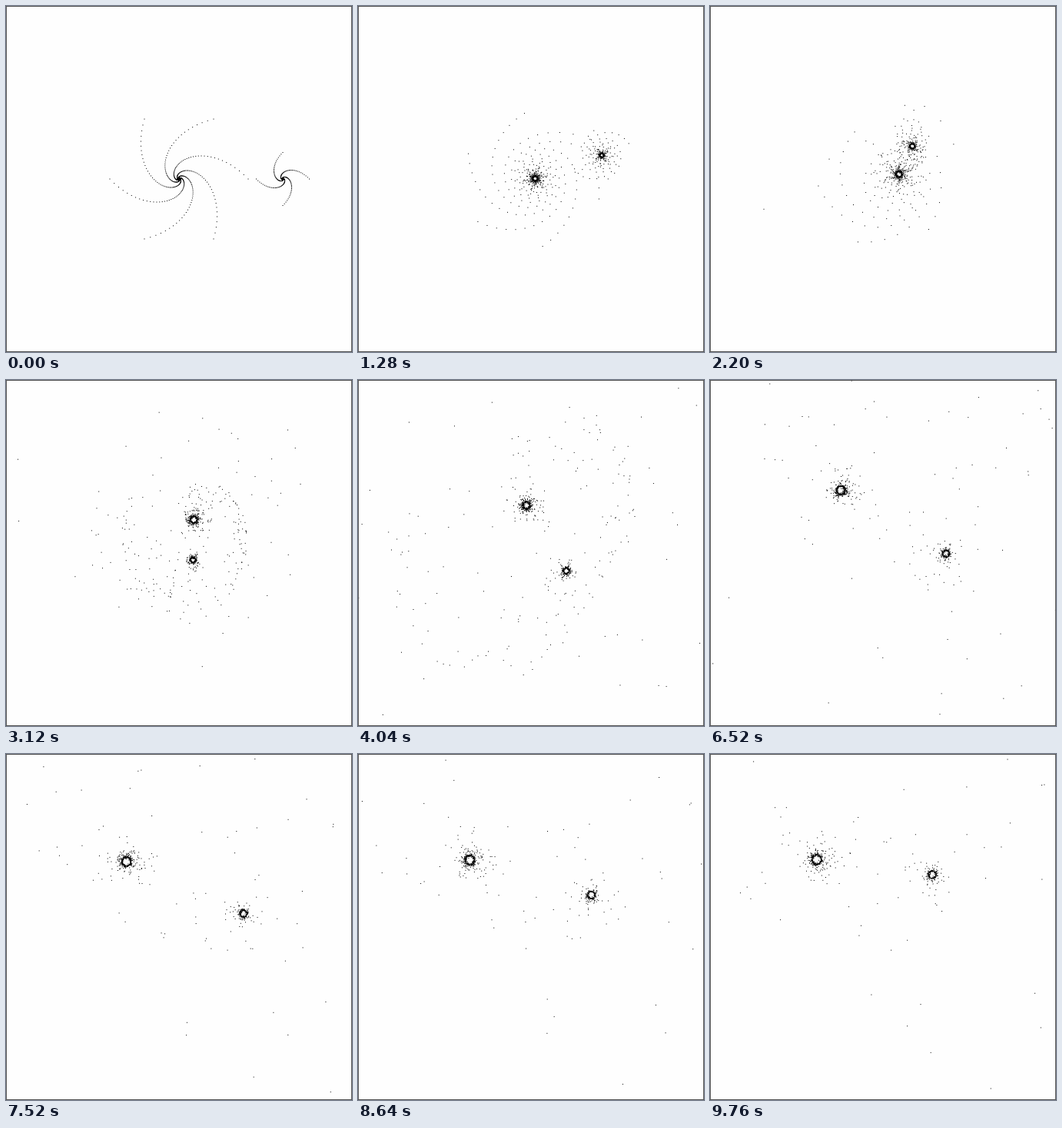
Write an HTML page with a canvas that moves like this. It is 450 px wide and 450 px high and loops after 9.8 s.

```html
<!DOCTYPE html>
<html>
<head>
<meta charset="utf-8">
<title>Galaxy encounter</title>
<style>
  html, body { margin: 0; width: 100%; height: 100%; overflow: hidden; background: #fefefe; }
  canvas { display: block; }
</style>
</head>
<body>
<canvas id="stage" width="450" height="450"></canvas>
<script>
const ctx = document.getElementById('stage').getContext('2d');
const SIZE = 450, FRAME_MS = 40, FRAMES = 245;
const SUBSTEPS = 120, DT = 1 / SUBSTEPS;
const HEATING = 0.0004;   // slow outward drift that opens the rings
const WIND = 1.045;       // logarithmic spiral: radians per e-fold of radius
const RATIO = Math.exp(-0.064), INNER = 0.4;

const cores = [
  { x: 225, y: 225, vx: 0, vy: 0, mass: 317, arms: 6, radius: 90 },
  { x: 360, y: 225, vx: -1, vy: -1, mass: 158, arms: 4, radius: 34.5 }
];

function makeStars(core) {
  const stars = [];
  for (let arm = 0; arm < core.arms; arm++) {
    for (let r = core.radius; r > INNER; r *= RATIO) {
      const angle = arm * 2 * Math.PI / core.arms - WIND * Math.log(core.radius / r);
      const c = Math.cos(angle), s = Math.sin(angle), speed = Math.sqrt(core.mass / r);
      stars.push({
        x: core.x + r * c, y: core.y + r * s,
        vx: core.vx + speed * s, vy: core.vy - speed * c
      });
    }
  }
  return stars;
}

const stars = cores.flatMap(makeStars);
const [big, small] = cores;

function pull(body, core) {
  const dx = core.x - body.x, dy = core.y - body.y;
  const d2 = dx * dx + dy * dy + 1e-6;
  const k = core.mass / (d2 * Math.sqrt(d2));
  body.ax += dx * k;
  body.ay += dy * k;
}

function move(body, heating) {
  body.vx += body.ax * DT;
  body.vy += body.ay * DT;
  body.x += (body.vx - heating * body.ax) * DT;
  body.y += (body.vy - heating * body.ay) * DT;
}

function step() {
  for (const star of stars) {
    star.ax = star.ay = 0;
    pull(star, big);
    pull(star, small);
    move(star, HEATING);
  }
  for (const core of cores) core.ax = core.ay = 0;
  pull(big, small);
  pull(small, big);
  for (const core of cores) move(core, 0);
}

const history = [];
for (let f = 0; f < FRAMES; f++) {
  history.push(Float32Array.from(stars.flatMap(s => [s.x, s.y])));
  for (let i = 0; i < SUBSTEPS; i++) step();
}

function draw(points) {
  ctx.fillStyle = '#fefefe';
  ctx.fillRect(0, 0, SIZE, SIZE);
  ctx.fillStyle = '#000';
  for (let i = 0; i < points.length; i += 2) {
    ctx.fillRect(points[i] - 0.5, points[i + 1] - 0.5, 1, 1);
  }
  ctx.strokeStyle = '#555';
  ctx.strokeRect(0.5, 0.5, SIZE - 1, SIZE - 1);
}

const start = performance.now();
function tick() {
  draw(history[Math.floor((performance.now() - start) / FRAME_MS) % FRAMES]);
  requestAnimationFrame(tick);
}
tick();
</script>
</body>
</html>
```
